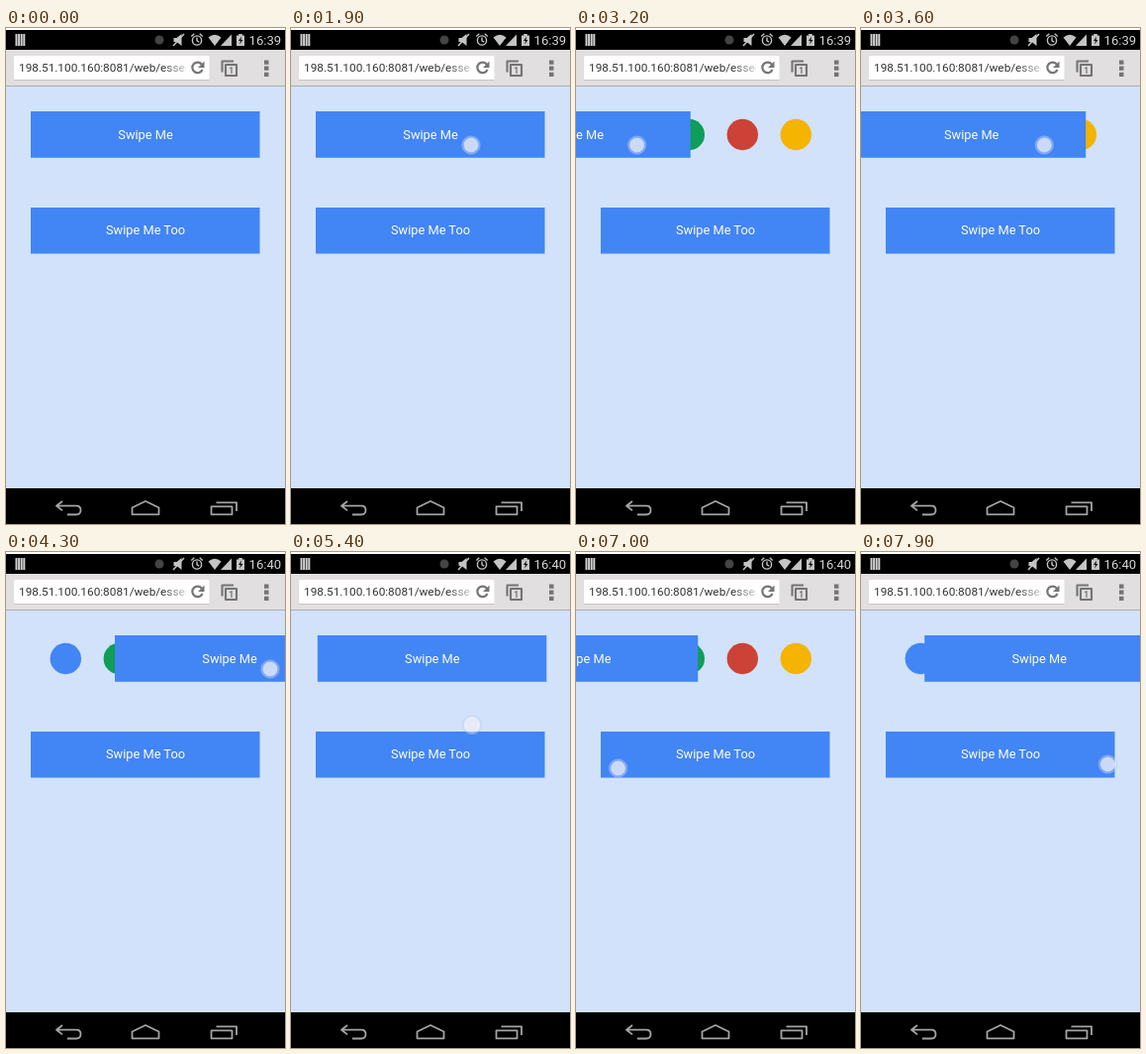
Animation, 282 px wide and 500 px high, one loop 8 s. Source, as an HTML page:

```html
<!DOCTYPE html>
<html lang="en">
<head>
<meta charset="utf-8">
<title>Swipe demo</title>
<style>
  html, body { margin: 0; width: 100%; height: 100%; overflow: hidden; background: #fff; }
  svg { display: block; width: 282px; height: 500px; font-family: Roboto, sans-serif; }
  .card { fill: #4285f4; }
  .label { font-size: 12.8px; fill: #fff; text-anchor: middle; }
  .line { fill: none; stroke-linejoin: round; }
</style>
</head>
<body>
<svg viewBox="0 0 282 500">
  <defs>
    <linearGradient id="fade" gradientUnits="userSpaceOnUse" x1="158" x2="184" y1="0" y2="0">
      <stop offset="0" stop-color="#fff" stop-opacity="0"/>
      <stop offset="1" stop-color="#fff" stop-opacity=".85"/>
    </linearGradient>
    <clipPath id="urlClip"><rect x="8" y="28" width="173.5" height="25"/></clipPath>
  </defs>

  <rect y="59" width="282" height="406" fill="#d1e2fa"/>

  <g id="dots"></g>
  <g id="card">
    <rect class="card" x="25" y="84" width="231.5" height="46.8"/>
    <text class="label" x="141" y="111.5">Swipe Me</text>
  </g>
  <rect class="card" x="25" y="181" width="231.5" height="46.5"/>
  <text class="label" x="141" y="208.3">Swipe Me Too</text>

  <g id="touch">
    <circle r="9.3" fill="#eef0fa" fill-opacity=".35" stroke="#9db3e2" stroke-opacity=".4"/>
    <circle r="7" fill="#ecedf6" fill-opacity=".7" stroke="#fff" stroke-opacity=".35"/>
  </g>

  <!-- status bar -->
  <rect y="2" width="282" height="20" fill="#000"/>
  <path class="line" d="M10.5 6V18M13.1 6V18M15.7 6V18M18.3 6V18" stroke="#d0d0d0" stroke-width="2"/>
  <circle cx="155" cy="12" r="4.5" fill="#444"/>
  <g fill="#c4c4c4">
    <path d="M169.500 10h3l5-4v12l-5-4h-3z"/>
    <path d="M204.500 9.500Q211 4 217.500 9.500L211 18z"/>
    <path d="M228 6.500V18H217z"/>
    <path d="M233 7.500h2.200v-1.500h3.600v1.500H241V18h-8z"/>
  </g>
  <path class="line" d="M180 6L169 18" stroke="#c4c4c4" stroke-width="1.5"/>
  <path d="M238 8.500l-3 4.500h2l-1 3.500 3.500-4.500h-2z" fill="#111"/>
  <g class="line" stroke="#c4c4c4" stroke-width="1.4">
    <circle cx="193" cy="12.5" r="4.6"/>
    <path d="M193 9.500v3.300l2.200 1.300M187.300 8.500l3-2.700M198.700 8.500l-3-2.700"/>
  </g>
  <text id="clock" x="245.6" y="16.8" font-size="13.1" fill="#d4d4d4"></text>

  <!-- browser toolbar -->
  <rect y="22" width="282" height="36" fill="#e1dfe0"/>
  <rect y="58" width="282" height="1" fill="#adadb2"/>
  <rect x="8" y="28" width="197.5" height="24.5" rx="1.5" fill="#fff"/>
  <path d="M8 52.500H205.500" stroke="#c6c4c5"/>
  <text x="13" y="44.4" font-size="11.8" fill="#333" clip-path="url(#urlClip)">198.51.100.160:8081/web/essen</text>
  <rect x="158" y="30" width="25" height="20" fill="url(#fade)"/>
  <path class="line" d="M198 36.800A5.300 5.300 0 1 0 198.500 42" stroke="#757575" stroke-width="2.2"/>
  <path d="M200.500 33.500v6.500h-6.500z" fill="#757575"/>
  <g class="line" stroke="#747474" stroke-width="2.1">
    <path d="M218.500 44.500V33.500H230"/>
    <rect x="222" y="37" width="11" height="11"/>
  </g>
  <text x="227.6" y="45.5" font-size="8.5" font-weight="bold" fill="#747474" text-anchor="middle">1</text>
  <path d="M261 32.500h4.500v4.200H261zM261 38.600h4.500v4.200H261zM261 44.700h4.500v4.200H261z" fill="#747474"/>

  <!-- navigation bar -->
  <rect y="464" width="282" height="36" fill="#000"/>
  <g class="line" stroke="#a4a4a4" stroke-width="1.8">
    <path d="M57 477l-6 4.700 6 4.700M51 481.700H71q4.500 0 4.500 4.400T71 490.500H62"/>
    <path d="M127.500 490.300V483.500L141 477 154.500 483.500V490.300z"/>
    <path d="M207.500 482.300H228.500V490.300H207.500zM212.500 478.300H233V487"/>
  </g>
</svg>
<script>
const LOOP = 8000, STEP = 100;
const TOUCH_START = 19, CLOCK_TICK = 40;  // in steps
const ORIGIN = { x: 182, y: 118 };        // where the finger goes down

// Each swipe eases the finger to a new position; between swipes it rests
const swipesX = [
  { from: 19, until: 28, to: 25 },
  { from: 29.1, until: 40.5, to: 267 },
  { from: 44, until: 53.6, to: 183 },
  { from: 58.8, until: 70.8, to: 41 },
  { from: 71.5, until: 81, to: 274 }
];
const swipesY = [
  { from: 50.6, until: 58.6, to: 265 },
  { from: 58.6, until: 62.2, to: 218 },
  { from: 71, until: 79, to: 214 }
];

const $ = id => document.getElementById(id);
const clamp = u => Math.min(1, Math.max(0, u));
const ease = u => (1 - Math.cos(Math.PI * u)) / 2;

const follow = (swipes, origin, step) => swipes.reduce(
  (pos, { from, until, to }) => pos + (to - pos) * ease(clamp((step - from) / (until - from))),
  origin
);
const fingerX = step => follow(swipesX, ORIGIN.x, step);
const fingerY = step => follow(swipesY, ORIGIN.y, step);

function place(id, x, y) {
  $(id).setAttribute("transform", `translate(${x.toFixed(2)} ${y.toFixed(2)})`);
}

$("dots").innerHTML = ["#4285f4", "#0f9d58", "#cc4236", "#f4b400"]
  .map((color, i) => `<circle cx="${60.3 + 54 * i}" cy="107.5" r="15.7" fill="${color}"/>`)
  .join("");

function render(ms) {
  const step = Math.floor(ms % LOOP / STEP);
  place("card", fingerX(step - 1) - ORIGIN.x, 0);  // trails the finger by one step
  place("touch", fingerX(step), fingerY(step));
  $("touch").setAttribute("visibility", step >= TOUCH_START ? "visible" : "hidden");
  $("clock").textContent = step < CLOCK_TICK ? "16:39" : "16:40";
}

const start = performance.now();
function tick() {
  render(performance.now() - start);
  requestAnimationFrame(tick);
}
tick();
</script>
</body>
</html>
```
